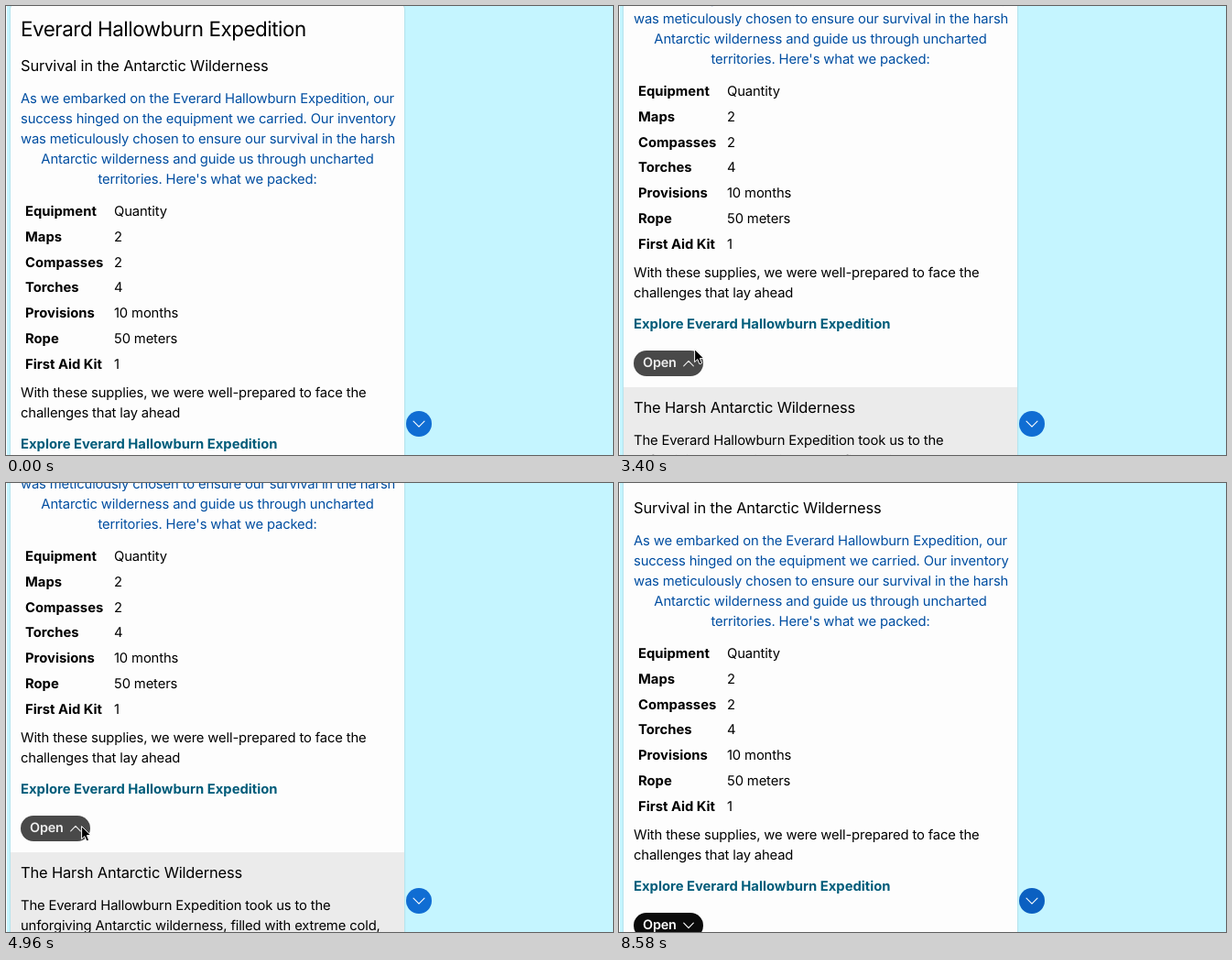
Animation of 663x490 px, one loop 9 s. Source, as an HTML page:

```html
<!DOCTYPE html>
<html lang="en">
<head>
<meta charset="utf-8">
<title>Expedition card</title>
<style>
  html, body { margin: 0; width: 100%; height: 100%; overflow: hidden; background: #fff; }
  #stage {
    position: relative; width: 663px; height: 490px; overflow: hidden;
    font: 14.8px/22px Inter, sans-serif; letter-spacing: -.01em; color: #000;
    white-space: nowrap; text-rendering: geometricPrecision;
  }
  #stage * { box-sizing: border-box; }
  #page, #page > *, #card > *, #more > *, .cursor { position: absolute; margin: 0; }
  #page { left: 0; top: 0; width: 100%; }
  #bubble { left: 1px; right: -10px; top: -60px; height: 615px; background: #c5f5ff; border-radius: 8px; }
  #card {
    left: 5px; top: -2px; width: 430px; height: 548px; background: #fdfdfd;
    border-radius: 5px; box-shadow: 0 0 2px rgba(0, 0, 0, .25);
  }
  #card > *, #more > * { left: 11px; }
  h1, h2 { font-weight: 400; }
  h1 { top: 13px; font-size: 22.4px; line-height: 30px; letter-spacing: -.021em; }
  h2 { font-size: 16.45px; line-height: 24px; }
  b, #link { font-weight: 700; letter-spacing: 0; }
  #sub { top: 55px; }
  #intro { top: 92px; width: 408px; text-align: center; color: #004ea1; }
  #kit { top: 213px; display: grid; grid-template-columns: 97px auto; grid-auto-rows: 27.75px; line-height: 27.75px; padding-left: 5px; }
  #outro { top: 413px; }
  #link { top: 468.5px; color: #005c7a; }
  #toggle {
    top: 509px; width: 76px; height: 28px; padding-left: 10px; line-height: 28px;
    border-radius: 14px; background: #0b0b0b; color: #fff; font-size: 14.4px; font-weight: 600;
  }
  #toggle svg { position: absolute; left: 54px; top: 10px; }
  #more { display: none; left: 0 !important; top: 549px; width: 430px; height: 170px; background: #ebebeb; }
  #more h2 { top: 10px; }
  #more p { top: 47px; }
  #date { left: 396px; top: 565px; font-size: 12px; letter-spacing: 0; color: #444; }
  .open #bubble { height: 798px; }
  .open #card { height: 731px; }
  .open #more { display: block; }
  .open #date { top: 748px; }
  .open #toggle { background: #494949; color: #eee; }
  .open #toggle svg { transform: scaleY(-1); }
  #down { position: absolute; left: 437px; top: 442px; width: 28px; height: 28px; border-radius: 50%; background: #106dd3; }
  .hover #down { background: #0b60c1; }
  #down svg { position: absolute; left: 7px; top: 10px; }
  svg { display: block; overflow: visible; }
  .chevron { fill: none; stroke: currentColor; stroke-width: 1.1; stroke-linecap: round; stroke-linejoin: round; }
  .cursor { left: 0; top: 0; visibility: hidden; }
</style>
</head>
<body>
<div id="stage">
  <div id="page">
    <div id="bubble"></div>
    <div id="card">
      <h1>Everard Hallowburn Expedition</h1>
      <h2 id="sub">Survival in the Antarctic Wilderness</h2>
      <p id="intro">As we embarked on the Everard Hallowburn Expedition, our<br>success hinged on the equipment we carried. Our inventory<br>was meticulously chosen to ensure our survival in the harsh<br>Antarctic wilderness and guide us through uncharted<br>territories. Here's what we packed:</p>
      <div id="kit">
        <b>Equipment</b><span>Quantity</span>
        <b>Maps</b><span>2</span>
        <b>Compasses</b><span>2</span>
        <b>Torches</b><span>4</span>
        <b>Provisions</b><span>10 months</span>
        <b>Rope</b><span>50 meters</span>
        <b>First Aid Kit</b><span>1</span>
      </div>
      <p id="outro">With these supplies, we were well-prepared to face the<br>challenges that lay ahead</p>
      <div id="link">Explore Everard Hallowburn Expedition</div>
      <div id="toggle">Open<svg class="chevron" width="12" height="8"><path d="M.7 1.2 6 6.6 11.3 1.2"/></svg></div>
      <div id="more">
        <h2>The Harsh Antarctic Wilderness</h2>
        <p>The Everard Hallowburn Expedition took us to the<br>unforgiving Antarctic wilderness, filled with extreme cold,<br>isolation, and constant danger. Our survival equipment was<br>our lifeline in these remote landscapes, ensuring our safety<br>and enabling us to explore the unknown with confidence</p>
      </div>
    </div>
    <div id="date">Tuesday, 10/31/23</div>
  </div>
  <div id="down"><svg class="chevron" width="14" height="9" color="#fff"><path d="M1 1.2 7 7.2 13 1.2"/></svg></div>
  <svg class="cursor" id="arrow" width="12" height="18"><path d="M.6.6V14.6L3.8 11.6 6 16.8 8.6 15.7 6.4 10.6H10.8Z" stroke="#fff"/></svg>
  <svg class="cursor" id="beam" width="8" height="16" fill="none" stroke-linecap="round">
    <defs><path id="bar" d="M-3-7.5Q0-7.5 0-5.5Q0-7.5 3-7.5M0-5.5V5.5M-3 7.5Q0 7.5 0 5.5Q0 7.5 3 7.5M-1.5 2.5H1.5"/></defs>
    <use href="#bar" stroke="#fff" stroke-width="3"/>
    <use href="#bar" stroke="#000" stroke-width="1.2"/>
  </svg>
  <svg class="cursor" id="hand" width="16" height="20"><path d="M-1.5 1.5Q0-.5 1.5 1.5V7Q3.5 6 4.5 7.6Q6.5 6.8 7.3 8.4Q9.6 7.8 9.6 10.5V13Q9 16 7.5 19H-.5Q-2 15.5-4.6 12.4Q-5.4 10-3.4 10.4L-1.5 12Z" fill="#fff" stroke="#000" stroke-linejoin="round"/></svg>
</div>
<script>
  const LOOP = 9000;
  const $ = id => document.getElementById(id);

  // Moves: [start, end, steps, target, power]
  const scroll = { from: [0], moves: [
    [860, 1570, 12, [58]],
    [1810, 2390, 11, [124], 1.23],
    [3400, 4200, 15, [265], 1.11],
    [4320, 5190, 16, [103.5]],
    [5250, 5480, 5, [38]],
  ] };
  const pointer = { from: [35, 407], moves: [
    [440, 500, 2, [99, 409]],
    [860, 980, 3, [99, 402]],
    [2100, 2390, 6, [85, 393]],
    [3040, 3160, 3, [82, 374]],
    [5840, 6480, 11, [68, 480]],
    [6710, 7110, 7, [191, 383]],
    [7650, 7880, 5, [204, 438]],
    [8410, 8580, 4, [630, 495]],
  ] };
  const shapes = [[440, 'arrow'], [5840, 'beam'], [7820, 'hand'], [8410, 'arrow'], [8580, '']];

  function at({ from, moves }, t) {
    let pos = from;
    for (const [start, end, steps, to, power = 1] of moves) {
      if (t < start) break;
      const step = 1 + Math.floor((t - start) / (end - start) * (steps - 1) + .1);
      const p = Math.min(1, step / steps) ** power;
      pos = pos.map((v, i) => v + (to[i] - v) * p);
    }
    return pos.map(Math.round);
  }

  function draw(t) {
    const [y] = at(scroll, t);
    $('page').style.transform = `translateY(${-y}px)`;
    const shape = shapes.reduce((now, [time, id]) => t >= time ? id : now, '');
    const [px, py] = at(pointer, t);
    for (const el of document.querySelectorAll('.cursor')) {
      el.style.visibility = el.id === shape ? 'visible' : 'hidden';
      el.style.transform = `translate(${px}px, ${py}px)`;
    }
    $('stage').classList.toggle('open', t >= 2640 && t < 6710);
    $('stage').classList.toggle('hover', t >= 8500);
  }

  const begin = performance.now();
  (function tick() {
    draw((performance.now() - begin) % LOOP);
    requestAnimationFrame(tick);
  })();
</script>
</body>
</html>
```
